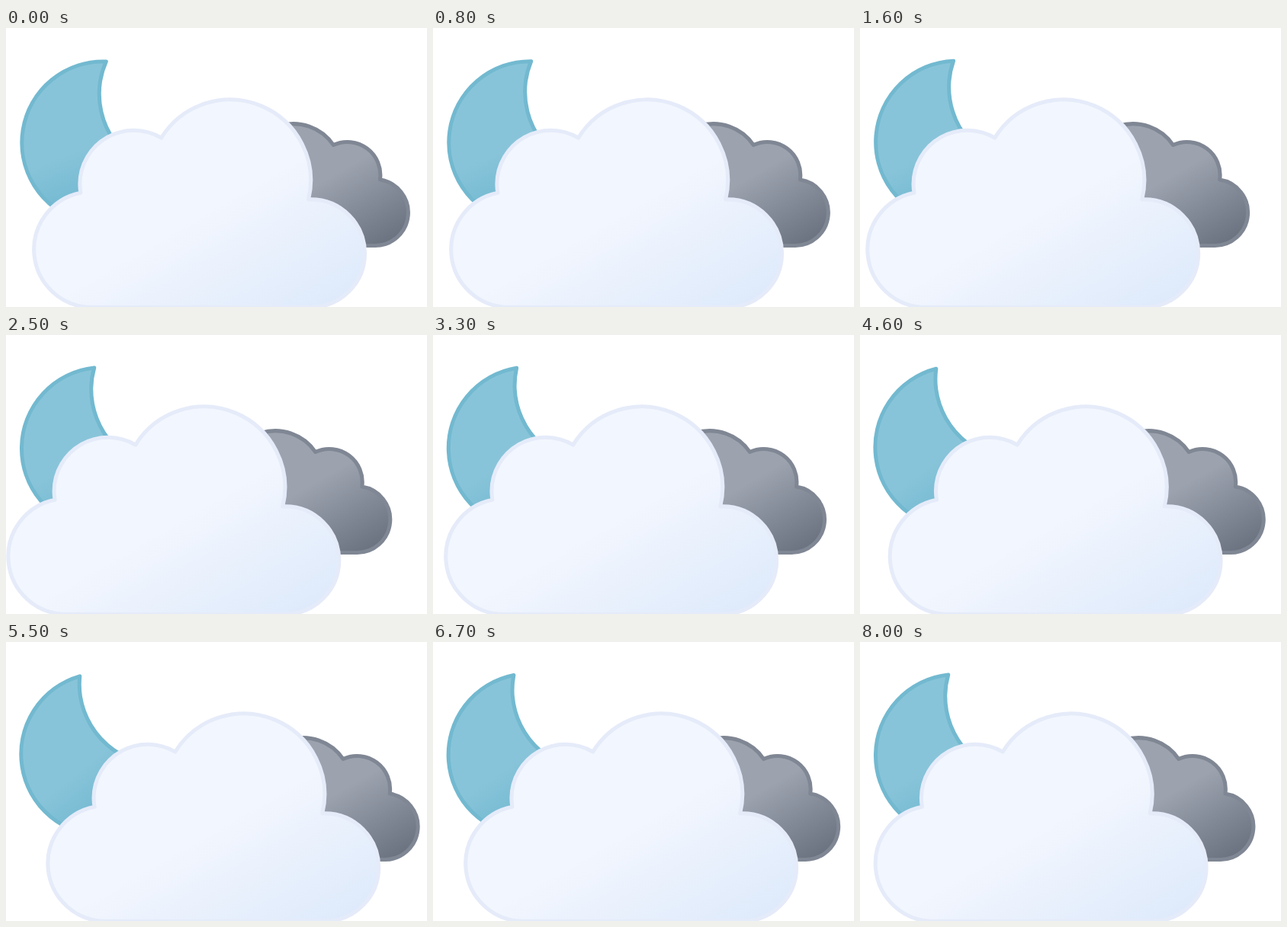
Recreate the animation shown at these times as an HTML page. Size 552 by 366 pixels, loop 8100 ms.

```html
<!DOCTYPE html>
<html lang="en">
<head>
<meta charset="utf-8">
<title>Overcast night</title>
<style>
  html, body { margin: 0; width: 100%; height: 100%; overflow: hidden; background: #fff; }
  svg { display: block; width: 552px; height: 366px; }
  path { stroke-width: .5; stroke-linejoin: round; }
</style>
</head>
<body>
<svg viewBox="0 0 552 366">
  <defs>
    <linearGradient id="night" gradientUnits="userSpaceOnUse" x1="13.58" y1="15.57" x2="24.94" y2="35.24">
      <stop offset=".45" stop-color="#88c4d9"/><stop offset="1" stop-color="#60b0ca"/>
    </linearGradient>
    <linearGradient id="grey" gradientUnits="userSpaceOnUse" x1="40.76" y1="23" x2="50.83" y2="40.46">
      <stop offset=".45" stop-color="#9ca3af"/><stop offset="1" stop-color="#6b7280"/>
    </linearGradient>
    <linearGradient id="pale" gradientUnits="userSpaceOnUse" x1="22.56" y1="21.96" x2="39.2" y2="50.8">
      <stop offset=".45" stop-color="#f2f6fe"/><stop offset="1" stop-color="#deeafb"/>
    </linearGradient>
  </defs>
  <g transform="translate(-77.6 -93.3) scale(10.1)">
    <path id="moon" fill="url(#night)" stroke="#72b9d0"
      d="M29.28 26.68a10.61 10.61 0 0 1-10.68-10.54A10.5 10.5 0 0 1 18.95 13.5a10.54 10.54 0 1 0 11.5 13.11 11.48 11.48 0 0 1-1.17.07z"/>
    <path id="back" fill="url(#grey)" stroke="#808794"
      d="M55.7 28.95A4.3 4.3 0 0 1 54.92 37.5H38.14V28.05A6.3 6.3 0 0 1 49.64 24.43A4.3 4.3 0 0 1 55.7 28.95z"/>
    <path id="front" fill="url(#pale)" stroke="#e5ebf9"
      d="M46.5 31.5h-.32a10.49 10.49 0 0 0-19.11-8 7 7 0 0 0-10.57 6 7.21 7.21 0 0 0 .1 1.14A7.5 7.5 0 0 0 18 45.5h28.5a7 7 0 0 0 0-14z"/>
  </g>
</svg>
<script>
  const LOOP = 8100, STEP = 100, LEAD = 4.75;
  const [moon, back, front] = ['moon', 'back', 'front'].map(id => document.getElementById(id));

  // Linear swing from -1 to 1 and back, period in seconds
  const swing = (t, period) => 1 - Math.abs(2 - 4 * (t / period % 1));

  function draw(now) {
    const ms = Math.floor(now % LOOP / STEP) * STEP;
    const t = Math.max(ms / 1000, .05) + LEAD;
    const drift = swing(t, 7);
    moon.setAttribute('transform', `rotate(${10 * swing(t, 10)} 19.22 24.29)`);
    back.setAttribute('transform', `translate(${2.1 * drift})`);
    front.setAttribute('transform', `translate(${3 * drift})`);
  }

  const start = performance.now();
  function tick() {
    draw(performance.now() - start);
    requestAnimationFrame(tick);
  }
  tick();
</script>
</body>
</html>
```
